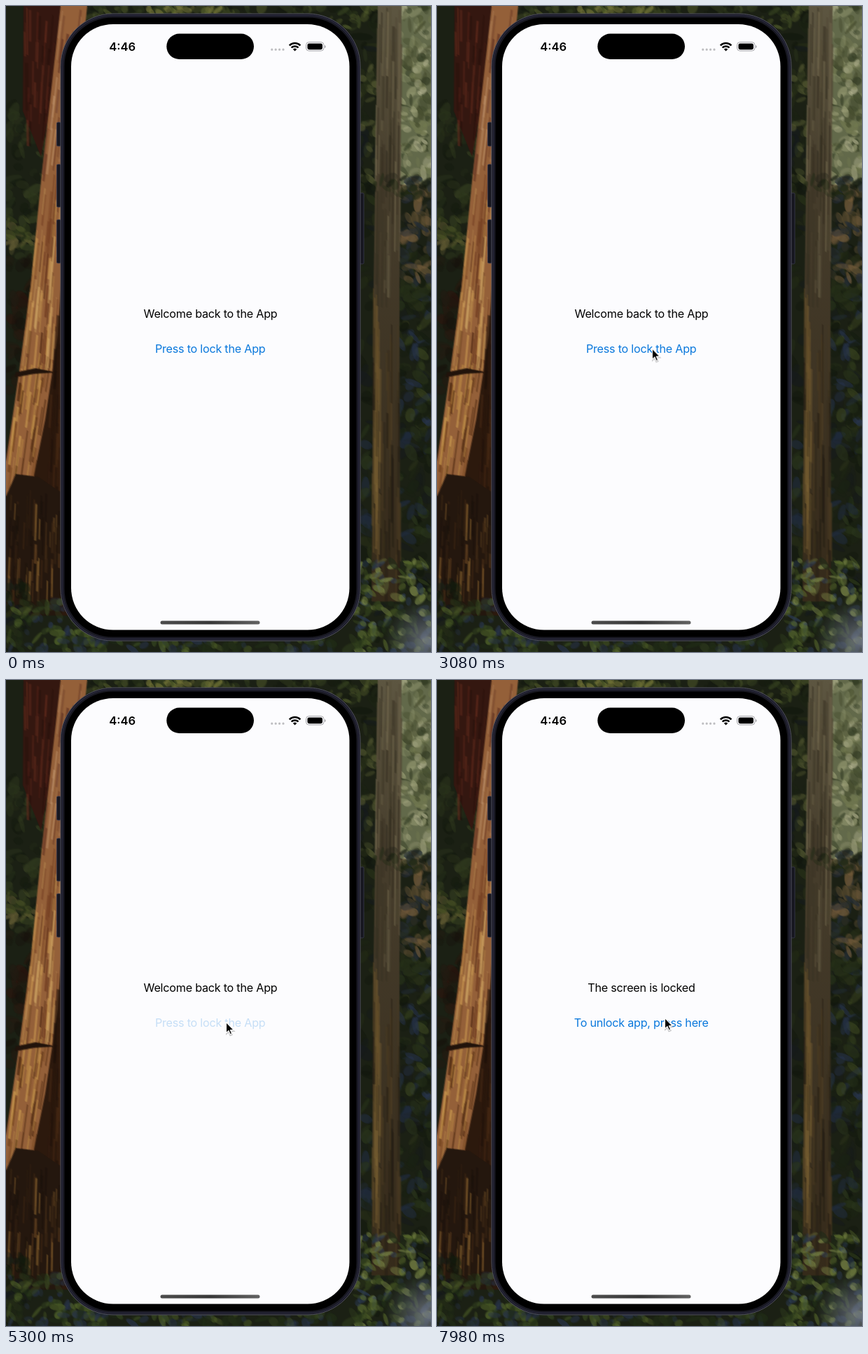
Animation of 607 by 922 pixels, one loop 8 s. Source, as an HTML page with a canvas:

```html
<!DOCTYPE html>
<html lang="en">
<head>
<meta charset="utf-8">
<title>App lock</title>
<style>
  html, body { margin: 0; width: 100%; height: 100%; overflow: hidden; background: #171b11; }
  canvas, svg { position: absolute; left: 0; top: 0; }
  text { font-family: Inter, "Open Sans", sans-serif; font-size: 16.2px; letter-spacing: -.25px; text-anchor: middle; }
  .clock { font-size: 16.6px; font-weight: 600; letter-spacing: 0; }
  .link { fill: #0a78dc; }
  .open, .locked, .pressable, .cursor { animation: 8s linear infinite; }
  .open { animation-name: open; }
  .locked { animation-name: locked; }
  .pressable { animation-name: press; }
  .cursor { animation-name: move; will-change: transform; }
  @keyframes open { 0%, 68% { visibility: visible; } 68.01%, 100% { visibility: hidden; } }
  @keyframes locked { 0%, 68% { visibility: hidden; } 68.01%, 100% { visibility: visible; } }
  @keyframes press { 0%, 65% { opacity: 1; } 65.01%, 68% { opacity: .22; } 68.01%, 100% { opacity: 1; } }
  @keyframes move {
    0%, 3% { transform: translate(620px, 590px); animation-timing-function: ease-out; }
    7.25%, 8.5% { transform: translate(514px, 531px); animation-timing-function: ease-in-out; }
    25%, 30% { transform: translate(327px, 459px); animation-timing-function: ease-in-out; }
    40%, 50% { transform: translate(306px, 490px); animation-timing-function: ease-in-out; }
    61%, 68% { transform: translate(314px, 488px); animation-timing-function: ease-in-out; }
    84%, 90% { transform: translate(326px, 477px); animation-timing-function: ease-in-out; }
    97%, 100% { transform: translate(325px, 482px); }
  }
</style>
</head>
<body>
<canvas id="forest" width="607" height="922"></canvas>
<svg width="607" height="922">
  <defs>
    <linearGradient id="bar">
      <stop offset="0" stop-color="#4c4c4c"/>
      <stop offset=".5" stop-color="#383838"/>
      <stop offset="1" stop-color="#626262"/>
    </linearGradient>
  </defs>

  <g fill="#16161f" stroke="#3b3b52" stroke-width=".8">
    <rect x="72.5" y="166" width="6" height="34" rx="1.5"/>
    <rect x="72.5" y="226" width="6" height="61" rx="1.5"/>
    <rect x="72.5" y="305" width="6" height="62" rx="1.5"/>
    <rect x="505" y="267" width="6" height="101" rx="1.5"/>
  </g>
  <rect x="78" y="11" width="428" height="895" rx="75" fill="#191922" stroke="#50505f"/>
  <rect x="80.5" y="13.5" width="423" height="890" rx="72" fill="none" stroke="#27273a" stroke-width="1.5"/>
  <rect x="83.5" y="16.5" width="417" height="884" rx="69" fill="#000"/>
  <rect x="93" y="26" width="397.5" height="864.5" rx="60" fill="#fcfcfe"/>

  <rect x="229.3" y="39.5" width="124.7" height="36.5" rx="18.25"/>
  <text class="clock" x="166.2" y="64">4:46</text>
  <path d="M379.8 62.2h17" stroke="#bdbdc0" stroke-width="3.2" stroke-linecap="round" stroke-dasharray="0 5.4"/>
  <g fill="none" stroke="#000" stroke-width="2.5">
    <path d="M404.8 56.3a11 11 0 0 1 15.6 0"/>
    <path d="M407.6 59.5a7 7 0 0 1 10 0"/>
  </g>
  <path d="M412.6 64.5l-2.7-2.8a3.9 3.9 0 0 1 5.4 0z"/>
  <rect x="428.6" y="51.6" width="25.3" height="12.4" rx="4" fill="none" stroke="#a4a4a8"/>
  <rect x="430.5" y="53.4" width="21.5" height="8.8" rx="2.4"/>
  <path d="M455.1 56v4q1.6-.5 1.6-2t-1.6-2" fill="#a4a4a8"/>
  <rect x="220.5" y="877.5" width="142" height="5" rx="2.5" fill="url(#bar)"/>

  <g class="open">
    <text x="292" y="444.7">Welcome back to the App</text>
    <g class="pressable"><text class="link" x="291.7" y="495">Press to lock the App</text></g>
  </g>
  <g class="locked">
    <text x="292" y="444.7">The screen is locked</text>
    <text class="link" x="291.7" y="495">To unlock app, press here</text>
  </g>
</svg>
<svg class="cursor" width="16" height="22">
  <path d="M.5 2v15.2l3.5-3.2 2.3 5.2 2.4-1-2.3-5.1h4.9z" opacity=".2" stroke="#000" stroke-width="2"/>
  <path d="M.5.5v15.2l3.5-3.2 2.3 5.2 2.4-1-2.3-5.1h4.9z" stroke="#fff" stroke-width="1.1" stroke-linejoin="round"/>
</svg>
<script>
  const canvas = document.getElementById('forest');
  const ctx = canvas.getContext('2d');
  let seed = 29;
  const rand = () => (seed = seed * 16807 % 2147483647) / 2147483647;
  const pick = list => list[Math.floor(rand() * list.length)];

  function leaves(x, y, w, h, count, size, colors) {
    for (let i = 0; i < count; i++) {
      ctx.fillStyle = pick(colors);
      ctx.globalAlpha = .3 + rand() * .45;
      ctx.beginPath();
      ctx.ellipse(x + rand() * w, y + rand() * h, size * (.4 + rand()), size * (.25 + rand() * .5), rand() * 3, 0, 7);
      ctx.fill();
    }
    ctx.globalAlpha = 1;
  }

  function shape(color, points) {
    ctx.fillStyle = color;
    ctx.beginPath();
    points.forEach(([x, y]) => ctx.lineTo(x, y));
    ctx.fill();
  }

  // Bark streaks between a top span and a bottom span
  function bark(y0, a0, b0, y1, a1, b1, count, colors) {
    for (let i = 0; i < count; i++) {
      const across = rand(), from = rand() * .85, to = Math.min(1, from + .1 + rand() * .25);
      const at = k => {
        const left = a0 + (a1 - a0) * k, right = b0 + (b1 - b0) * k;
        return [left + (right - left) * across, y0 + (y1 - y0) * k];
      };
      ctx.strokeStyle = pick(colors);
      ctx.globalAlpha = .3 + rand() * .4;
      ctx.lineWidth = 1 + rand() * 3;
      ctx.beginPath();
      ctx.moveTo(...at(from));
      ctx.lineTo(...at(to));
      ctx.stroke();
    }
    ctx.globalAlpha = 1;
  }

  const dark = ['#10160c', '#1c2413', '#283018', '#161a1c'];
  const green = ['#202c16', '#374722', '#4f6029', '#28334a'];

  ctx.fillStyle = '#1b2014';
  ctx.fillRect(0, 0, 607, 922);

  // Top strip and left woods
  leaves(115, 0, 415, 30, 110, 10, ['#1c2414', '#354020', '#56602e', '#14190f']);
  leaves(200, 0, 120, 14, 35, 7, ['#78783a', '#5a6530', '#333e1c']);
  leaves(0, 130, 65, 230, 100, 11, ['#151b10', '#28301a', '#343d20']);
  leaves(0, 300, 42, 50, 25, 8, ['#4a5126', '#333d1c', '#676036']);
  shape('#341710', [[25, 0], [78, 0], [66, 130], [50, 215], [24, 150]]);
  bark(0, 25, 78, 200, 30, 58, 35, ['#4f2117', '#230f0b', '#602b1d']);
  leaves(0, 360, 40, 190, 45, 12, ['#17120c', '#2c160e', '#211c12']);

  // Sunlit trunk on the left
  shape('#2c190d', [[80, 200], [100, 870], [0, 870], [0, 640]]);
  shape('#946039', [[78, 0], [116, 0], [82, 340], [74, 470], [56, 590], [36, 690], [0, 700], [0, 650], [19, 520], [35, 400], [50, 250]]);
  bark(0, 78, 116, 250, 50, 88, 45, ['#b88b63', '#71402b', '#c69b72', '#58291e']);
  bark(230, 53, 84, 520, 20, 67, 70, ['#c79650', '#6d381e', '#d1a765', '#47200f']);
  bark(490, 23, 68, 690, 0, 38, 50, ['#bd8c45', '#704019', '#d0a052', '#45230d']);
  shape('#21130b', [[14, 523], [42, 517], [72, 523], [40, 525], [13, 530]]);
  bark(400, 74, 86, 860, 45, 82, 45, ['#1c100a', '#492b16', '#2e1a10']);
  shape('#24170e', [[0, 700], [14, 668], [46, 672], [80, 695], [80, 870], [0, 870]]);
  bark(690, 8, 78, 850, 0, 76, 65, ['#694522', '#3e2815', '#1a110b', '#85602e']);
  leaves(0, 820, 30, 100, 40, 10, dark);
  leaves(0, 850, 130, 72, 90, 9, green);

  // Right woods
  leaves(500, 0, 107, 922, 250, 13, dark);
  leaves(500, 60, 32, 190, 40, 9, ['#384023', '#545831', '#1a2113']);
  ctx.fillStyle = '#62694a';
  ctx.fillRect(563, 0, 44, 255);
  leaves(562, 0, 45, 260, 140, 9, ['#969a73', '#71784f', '#484e30', '#b0b08d', '#343d25']);
  leaves(565, 245, 42, 150, 75, 10, ['#594b30', '#2c2d21', '#755d3c', '#252d36']);
  leaves(560, 390, 47, 210, 75, 11, ['#263019', '#38421f', '#161d11', '#26334a']);
  leaves(506, 600, 101, 160, 75, 11, ['#192113', '#29341b', '#202b3c']);

  const trunk = ctx.createLinearGradient(0, 0, 0, 850);
  trunk.addColorStop(0, '#5d5641');
  trunk.addColorStop(.3, '#463d2c');
  trunk.addColorStop(1, '#352a1a');
  shape(trunk, [[531, 0], [565, 0], [562, 400], [563, 850], [522, 850], [525, 400]]);
  bark(0, 531, 565, 430, 525, 562, 65, ['#71674d', '#363022', '#544b37']);
  bark(430, 525, 562, 850, 522, 563, 50, ['#4c3c23', '#241e14', '#392e1c']);
  bark(400, 525, 536, 800, 523, 533, 30, ['#806737', '#5f4b28']);
  leaves(506, 245, 101, 25, 22, 9, ['#12180f', '#252c18']);

  // Undergrowth and pale corner haze
  leaves(500, 790, 107, 132, 170, 8, ['#39491f', '#5a6b2d', '#202c17', '#2c3b55', '#7c8948']);
  leaves(120, 903, 400, 19, 80, 9, green);
  const haze = ctx.createRadialGradient(600, 905, 0, 600, 905, 60);
  haze.addColorStop(0, 'rgba(128,134,145,.75)');
  haze.addColorStop(1, 'rgba(90,100,120,0)');
  ctx.fillStyle = haze;
  ctx.fillRect(530, 840, 77, 82);

  // Soften by averaging slightly shifted copies
  ctx.globalAlpha = .4;
  ctx.drawImage(canvas, 1, 1);
  ctx.drawImage(canvas, -1, -1);
</script>
</body>
</html>
```
